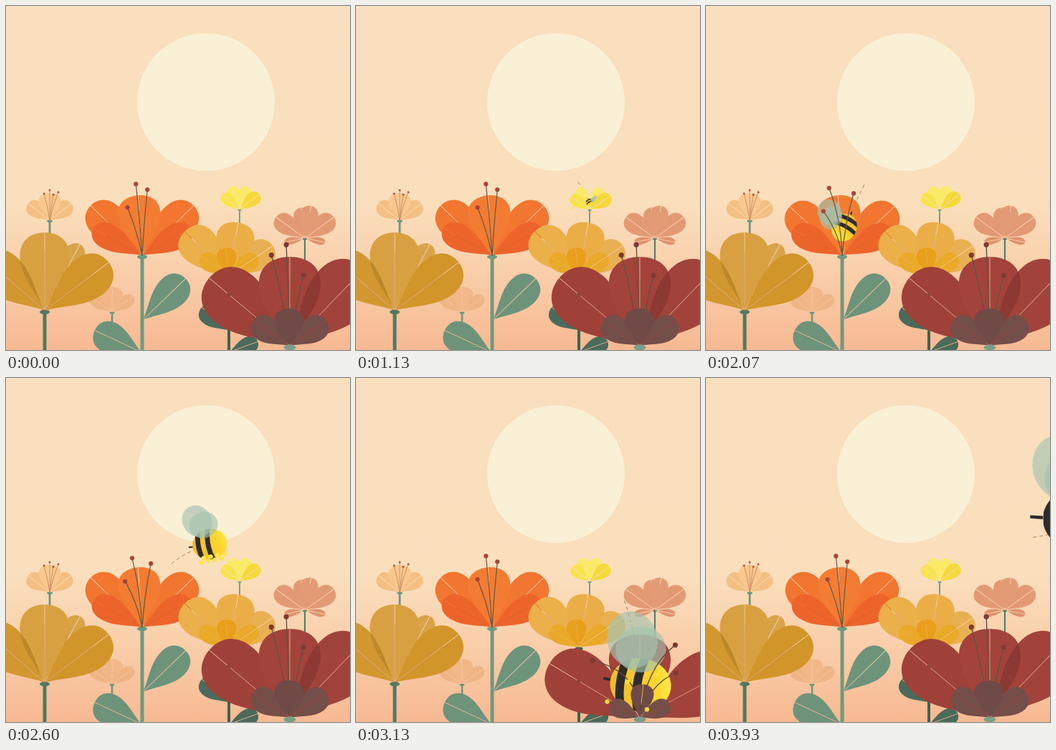
An HTML page with a canvas that plays this animation: 480x480 px, repeating every 3990 ms.

```html
<!DOCTYPE html>
<html>
<head>
<meta charset="utf-8">
<style>
html, body { margin: 0; height: 100%; overflow: hidden; background: #f9dfbe; }
canvas { display: block; width: 100vw; height: 100vh; }
</style>
</head>
<body>
<canvas width="480" height="480"></canvas>
<script>
const ctx = document.querySelector('canvas').getContext('2d');
const LOOP = 3990, RAD = Math.PI / 180;

// Each leg is a Bezier flight that ends inside a flower; the last one leaves the stage
const legs = [
  { start: 0, end: 1050, path: [[-15, 188], [120, 170], [290, 165], [326, 274]], size: [.1, .13], dive: 60 },
  { start: 1180, end: 2000, path: [[326, 274], [345, 110], [250, 154], [193, 309]], size: [.13, .44], dive: 62, flip: -1 },
  { start: 2190, end: 3100, path: [[193, 309], [220, 230], [377, 142], [397, 428]], size: [.44, .95], dive: 8 },
  { start: 3200, end: 3990, path: [[397, 428], [394, 122], [428, 279], [545, 178]], size: [.95, 1.14], dive: 0 }
];

const smooth = v => { v = Math.min(1, Math.max(0, v)); return v * v * (3 - 2 * v); };
const mix = (a, b, u) => a + (b - a) * u;
// Quick opening just before the bee lands, slow return after it
const push = (t, at, fall) => smooth((t - at + 130) / 120) * (1 - smooth((t - at - 60) / fall));
const polar = ([x, y], deg, r) => [x + r * Math.sin(deg * RAD), y - r * Math.cos(deg * RAD)];

function legAt(t) {
  let i = legs.length - 1;
  while (i && legs[i].start > t) i--;
  return i;
}

function pose(t) {
  const leg = legs[legAt(t)], { start, end, path, size, dive, flip = 1 } = leg;
  const u = Math.min(1, (t - start) / (end - start)), v = 1 - u;
  const [x, y] = [0, 1].map(k => v ** 3 * path[0][k] + 3 * v * v * u * path[1][k] +
    3 * v * u * u * path[2][k] + u ** 3 * path[3][k]);
  const s = mix(...size, u * u);
  const tilt = dive * smooth((u - .6) / .4) - 24 * (1 - s) * Math.sin(Math.PI * u);
  return { x, y, s, tilt, flip };
}

// Index of the flower holding the bee, or -1 in the air
function host(t) {
  const i = legAt(t);
  if (i < 3 && t > legs[i].end - 90) return i;
  return i && t < legs[i].start + 100 ? i - 1 : -1;
}

function line(color, width, path) {
  ctx.strokeStyle = color;
  ctx.lineWidth = width;
  ctx.stroke(new Path2D(path));
}

function oval(color, x, y, rx, ry = rx) {
  ctx.fillStyle = color;
  ctx.beginPath();
  ctx.ellipse(x, y, rx, ry, 0, 0, 7);
  ctx.fill();
}

// Teardrop from base b, pointing deg clockwise from up
function teardrop([x, y], deg, len, wide) {
  const side = w => `M0 0C${.2 * w} ${-.25 * len} ${w / 2} ${-.45 * len} ${w / 2} ${-.7 * len}` +
    `C${w / 2} ${-.9 * len} ${.28 * w} ${-len} 0 ${-len}Z`;
  const c = Math.cos(deg * RAD), s = Math.sin(deg * RAD);
  const shape = new Path2D();
  // Overlap the halves slightly to hide the seam
  for (const w of [wide, -wide]) shape.addPath(new Path2D(side(w)), new DOMMatrix([c, s, -s, c, x - c * Math.sign(w) * .4, y - s * Math.sign(w) * .4]));
  return shape;
}

function petal(b, color, deg, len, wide, vein) {
  ctx.fillStyle = color;
  ctx.fill(teardrop(b, deg, len, wide));
  if (vein) line('rgba(90,30,0,.12)', 1.2, `M${b}L${polar(b, deg, len * .75)}`);
}

function pair(b, color, deg, len, wide, vein) {
  petal(b, color, -deg, len, wide, vein);
  petal(b, color, deg, len, wide, vein);
}

function overlap(b, color, one, two) {
  ctx.save();
  ctx.clip(teardrop(b, ...one));
  petal(b, color, ...two);
  ctx.restore();
}

function stem([x, y], color, width, len) {
  line(color, width, `M${x} ${y}v${len}`);
  oval(color, x, y + width * .4, width * 1.4, width * .65);
}

// Stamens fan outwards by the given angle
function stamens(b, list, fan, color, tip, width, r) {
  for (const [deg, len] of list) {
    const end = polar(b, deg + fan * Math.sign(deg + 3), len * (1 - fan / 140));
    line(color, width, `M${b}Q${polar(b, deg * .7 + fan * .3, len / 2)} ${end}`);
    oval(tip, ...end, r);
  }
}

function pollen(t, x, y, start, size) {
  const u = (t - start) / 420;
  if (u <= 0 || u >= 1) return;
  ctx.globalAlpha = 1 - u * u;
  for (let i = 0; i < 5; i++) {
    const [px, py] = polar([0, 0], i * 72 + 100, (35 + i % 3 * 14) * size * Math.sqrt(u) * 1.7);
    oval('#fbe23c', x + px, y + py * .6 + 30 * u * u * size, 3.2 * size);
  }
  ctx.globalAlpha = 1;
}

function trail(t) {
  const { start, end } = legs[legAt(t)];
  let path = '';
  for (let s = Math.max(t - 195, start + 200); s <= Math.min(t - 90, end); s += 8) {
    const { x, y } = pose(s);
    path += (path ? 'L' : 'M') + x + ' ' + (y + 3);
  }
  ctx.setLineDash([5, 4]);
  line('rgba(150,95,65,.8)', 1, path);
  ctx.setLineDash([]);
}

function bee(t) {
  const { x, y, s, tilt, flip } = pose(t);
  const flap = Math.cos((t - 3530) / 266 * 2 * Math.PI);
  const yaw = 1 - smooth((t - 3200) / 250); // 1 turned to the viewer, 0 side view
  ctx.save();
  ctx.translate(x, y);
  ctx.scale(flip * s, s);
  ctx.rotate(tilt * RAD);

  line('#2b2929', 4, `M${-61 + 6 * yaw} -2L-42 -1`);
  const glow = ctx.createLinearGradient(-45, 10, 45, -10);
  glow.addColorStop(0, '#efb928');
  glow.addColorStop(.75, '#fbd62f');
  glow.addColorStop(1, '#ffe94c');
  ctx.save();
  oval(glow, 0, 0, 45, 39);
  ctx.clip();
  for (const stripe of [-38, -11, 14])
    line('#2e2c2c', 12.5, `M${stripe - 12 * yaw} -42q${-14 * yaw} 42 0 84`);
  ctx.restore();

  for (const [deg, dist, long] of [[-14 + 10 * flap, 47, 42], [-4 + 5 * flap, 31, 34]]) {
    ctx.save();
    ctx.translate(-2, -21);
    ctx.rotate(deg * RAD);
    oval('rgba(165,195,176,.65)', 0, -dist, 33 - 4 * flap, long);
    ctx.restore();
  }
  if (t > legs[2].start && host(t) < 0)
    for (let i = 0; i < 8; i++) oval('#fde545', i * 9 - 31, 37 + (i % 2 ? -5 : 5), 5.8);
  ctx.restore();
}

function sky() {
  const g = ctx.createLinearGradient(0, 0, 0, 480);
  ['#f9dfbe', '#fadfbc', '#fad8b5', '#f9caa5', '#f7b992']
    .forEach((color, i) => g.addColorStop([0, .57, .66, .82, 1][i], color));
  ctx.fillStyle = g;
  ctx.fillRect(0, 0, 480, 480);
  oval('#faf0d5', 279, 134, 96);
}

function peachFlower() {
  const b = [61, 299];
  stem(b, '#6b957d', 2.8, 25);
  pair(b, '#f5bf83', 52, 38, 24);
  petal(b, '#f8c88f', 0, 38, 32);
  stamens(b, [[-12, 38], [0, 42], [17, 41], [8, 36]], 0, '#c58055', '#b5523d', .8, 1.5);
}

function paleFlower() {
  const b = [148, 427];
  stem(b, '#6b957d', 2.5, 25);
  pair(b, '#efb486', 54, 37, 19);
  petal(b, '#f1b789', 0, 35, 31);
}

function mustardFlower() {
  const b = [54, 425], left = [-49, 114, 62], middle = [0, 109, 70];
  stem(b, '#4f7a62', 5, 55);
  petal(b, '#d9a34a', 28, 105, 36);
  petal(b, '#d2982f', ...left, true);
  petal(b, '#d9a041', ...middle, true);
  overlap(b, '#bd8829', middle, left);
  petal(b, '#d2952a', 53, 112, 62, true);
}

function orangeFlower(t, inside) {
  const b = [190, 348], open = push(t, 2070, 350);
  stem(b, '#6f9a80', 5, 132);
  petal([191, 438], '#6e937b', 46, 83, 46);
  petal([189, 483], '#6e937b', -65, 72, 44);
  pair(b, '#f27530', 46 + open, 100, 53, true);
  petal(b, '#f47c32', -4, 84, 60, true);
  if (inside) bee(t);
  pair(b, '#ed642b', 61 + open, 78, 37, true);
  stamens(b, [[-5, 100], [4.5, 92], [-17, 70]], 6 * push(t, 2070, 1000), '#625843', '#a8443a', 1.2, 3.1);
}

function yellowFlower(t, inside) {
  const b = [326, 284], open = 10 * push(t, 1130, 400);
  stem(b, '#76a088', 2, 20);
  pair(b, '#fbea62', 19 + open, 34, 18);
  if (inside) bee(t);
  petal(b, '#f9e34c', -50 - open / 2, 32, 18);
  petal(b, '#f5d93b', 52 + open / 2, 35, 20);
}

function pinkFlower() {
  const b = [417, 324];
  stem(b, '#55806a', 2.2, 38);
  pair(b, '#df926c', 101, 29, 11);
  pair(b, '#e39a74', 54, 50, 29);
  petal(b, '#e39a74', -7, 43, 25);
  petal(b, '#e39b76', 11, 46, 26);
}

function goldFlower() {
  const b = [311, 376];
  stem(b, '#3f6253', 4, 104);
  petal([311, 453], '#4a6a5b', -49, 50, 32);
  petal([311, 483], '#4a6a5b', 70, 43, 24);
  petal(b, '#e9b053', 56, 74, 42);
  petal(b, '#ebb04a', -45, 87, 55, true);
  petal(b, '#ebae47', 10, 75, 54, true);
  pair(b, '#eaa928', 56, 48, 26);
  petal(b, '#e89f1c', -7, 39, 28);
}

function redFlower(t, inside) {
  const b = [396, 474], open = push(t, 3130, 280);
  const middle = [0, 124 - 8 * open, 87], right = [44 + 18 * open, 150, 88];
  petal(b, '#9f4138', -50 - 9 * open, 147, 84, true);
  petal(b, '#a3433b', ...middle, true);
  petal(b, '#a2433b', ...right, true);
  overlap(b, '#8d3832', middle, right);
  if (inside) bee(t);
  stamens(b, [[-11.5, 129], [-2, 141], [11, 100]], 28 * push(t, 3130, 640), '#62513f', '#7d3a35', 1.4, 3.6);
  pair(b, '#744e49', 56 + 10 * open, 62 - 16 * open, 37 - 10 * open);
  petal(b, '#6f4a46', -2 + 8 * open, 52 - 5 * open, 41 - 8 * open);
  stem(b, '#7a9f88', 6, 6);
}

function draw(t) {
  const inside = host(t);
  sky();
  trail(t);
  peachFlower();
  paleFlower();
  mustardFlower();
  orangeFlower(t, inside === 1);
  yellowFlower(t, inside === 0);
  pinkFlower();
  goldFlower();
  redFlower(t, inside === 2);
  pollen(t, 326, 274, 1030, .5);
  pollen(t, 400, 435, 3020, 1);
  if (inside < 0) bee(t);
}

const begin = performance.now();
function tick() {
  draw((performance.now() - begin) % LOOP);
  requestAnimationFrame(tick);
}
tick();
</script>
</body>
</html>
```
